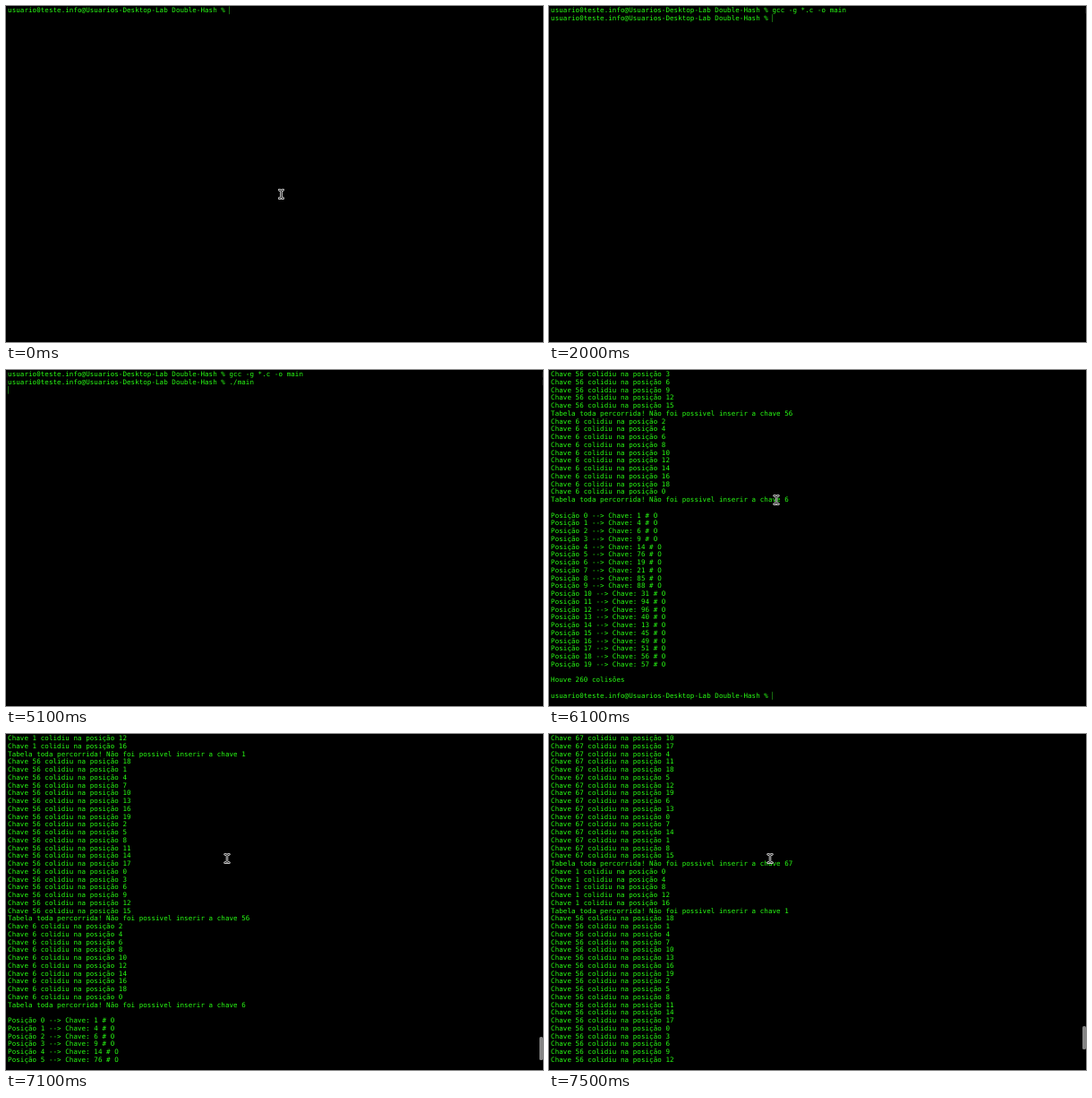
Animation of 600 by 375 pixels, one loop 8000 ms. Source, as an HTML page:

```html
<!DOCTYPE html>
<html lang="pt">
<head>
<meta charset="utf-8">
<title>Terminal</title>
<style>
  html, body { margin: 0; width: 100%; height: 100%; overflow: hidden; background: #000; }
  #stage { position: absolute; left: 0; top: 0; width: 600px; height: 375px; overflow: hidden; background: #000; }
  /* The terminal is laid out at 1440 x 900 and shown smaller. */
  #term { position: absolute; left: 0; top: 0; width: 1440px; height: 900px; transform: scale(.4166667); transform-origin: 0 0; }
  #text {
    position: absolute; left: 5px; top: 1px; margin: 0; color: #28fe14;
    font: 18px/21px "DejaVu Sans Mono", monospace;
    font-variant-ligatures: none; text-rendering: geometricPrecision; white-space: pre;
  }
  #caret { position: absolute; width: 1.2px; height: 21px; background: #38fe27; }
  .mark { position: absolute; left: 2px; right: 0; height: 15px; box-sizing: border-box; border: solid #333; border-width: 0 1px; }
  #knob { position: absolute; left: 596.4px; width: 3.2px; height: 25.4px; border-radius: 1.6px; background: #858585; }
  #mouse { position: absolute; left: -6px; top: -8px; width: 12px; height: 16px; }
  #mouse path { fill: none; stroke-linecap: round; }
</style>
</head>
<body>
<div id="stage">
  <div id="term">
    <pre id="text"></pre>
    <div class="mark" style="top:5px"></div>
    <div class="mark" style="top:26px"></div>
    <div id="caret"></div>
  </div>
  <div id="knob"></div>
  <svg id="mouse" viewBox="-6 -8 12 16">
    <path id="beam" stroke="#d8d8d8" stroke-width="2.3"
      d="M-2.4-4.7Q0-4.7 0-3.2Q0-4.7 2.4-4.7M0-3.2V3.2M-2.4 4.7Q0 4.7 0 3.2Q0 4.7 2.4 4.7"/>
    <use href="#beam"/>
    <path stroke="#000" stroke-width=".8"
      d="M-2.4-4.7Q0-4.7 0-3.2Q0-4.7 2.4-4.7M0-3.2V3.2M-2.4 4.7Q0 4.7 0 3.2Q0 4.7 2.4 4.7"/>
  </svg>
</div>
<script>
const LOOP = 8000, ROWS = 42, CELL = 11, LINE = 21;
const $ = id => document.getElementById(id);
const text = $('text'), caret = $('caret'), knob = $('knob'), mouse = $('mouse');
const marks = document.querySelectorAll('.mark');

const prompt = 'usuario0teste.info@Usuarios-Desktop-Lab Double-Hash % ';
const build = prompt + 'gcc -g *.c -o main';
const run = prompt + './main';

// Probes of one key in a table of 20 slots, then the failure line.
const probes = (key, start, step, count) => [
  ...Array.from({ length: count }, (_, i) => `Chave ${key} colidiu na posição ${(start + i * step) % 20}`),
  `Tabela toda percorrida! Não foi possivel inserir a chave ${key}`
];
const keys = [1, 4, 6, 9, 14, 76, 19, 21, 85, 88, 31, 94, 96, 40, 13, 45, 49, 51, 56, 57];
const output = [
  ...probes(67, 10, 7, 16), ...probes(1, 0, 4, 5),
  ...probes(56, 18, 3, 20), ...probes(6, 2, 2, 10), '',
  ...keys.map((key, i) => `Posição ${i} --> Chave: ${key} # O`),
  '', 'Houve 260 colisões', '', prompt
];

// time, lines, caret visible
const screens = [
  [0, [prompt], true],
  [100, [prompt], false],
  [400, [run], true],
  [700, [build], true],
  [1300, [build], false],
  [1800, [build, ''], true],
  [2000, [build, prompt], true],
  [2700, [build, build], true],
  [3000, [build, run], true],
  [3600, [build, run], false],
  [4300, [build, run], true],
  [4800, [build, run, ''], true],
  [5300, output, true]
];
// time, lines scrolled back
const scrolls = [[0, 0], [6600, 1], [6700, 3], [6800, 6], [6900, 10], [7000, 14],
  [7100, 18], [7200, 25], [7300, 31], [7400, 35], [7500, 38]];
// time, x, y
const pointer = [[0, 307.5, 210], [100, -50, -50], [6000, 279, 165], [6100, 254, 145], [6200, 247, 139]];

const at = (steps, t) => steps.findLast(step => step[0] <= t);
const show = (el, on) => { el.style.visibility = on ? 'visible' : 'hidden'; };

// Snap the font to the terminal's cell grid.
function fitGrid() {
  text.textContent = 'M'.repeat(100);
  const advance = text.offsetWidth / 100;
  text.style.letterSpacing = CELL - advance + 'px';
}

function draw(t) {
  const [, lines, caretOn] = at(screens, t);
  const back = at(scrolls, t)[1];
  const first = Math.max(0, lines.length - ROWS - back);
  const body = lines.slice(first, first + ROWS).join('\n');
  if (text.textContent !== body) text.textContent = body;

  const row = lines.length - 1 - first;
  caret.style.left = 5 + lines.at(-1).length * CELL + 'px';
  caret.style.top = 1 + row * LINE + 'px';
  show(caret, caretOn && row < ROWS);
  marks.forEach((mark, i) => show(mark, lines !== output && i < lines.length - 1));

  knob.style.top = 349 - back * .6 + 'px';
  show(knob, back > 0);

  const [, x, y] = at(pointer, t);
  mouse.style.transform = `translate(${x}px, ${y}px)`;
}

fitGrid();
const begin = performance.now();
function tick() {
  draw((performance.now() - begin) % LOOP);
  requestAnimationFrame(tick);
}
tick();
</script>
</body>
</html>
```
